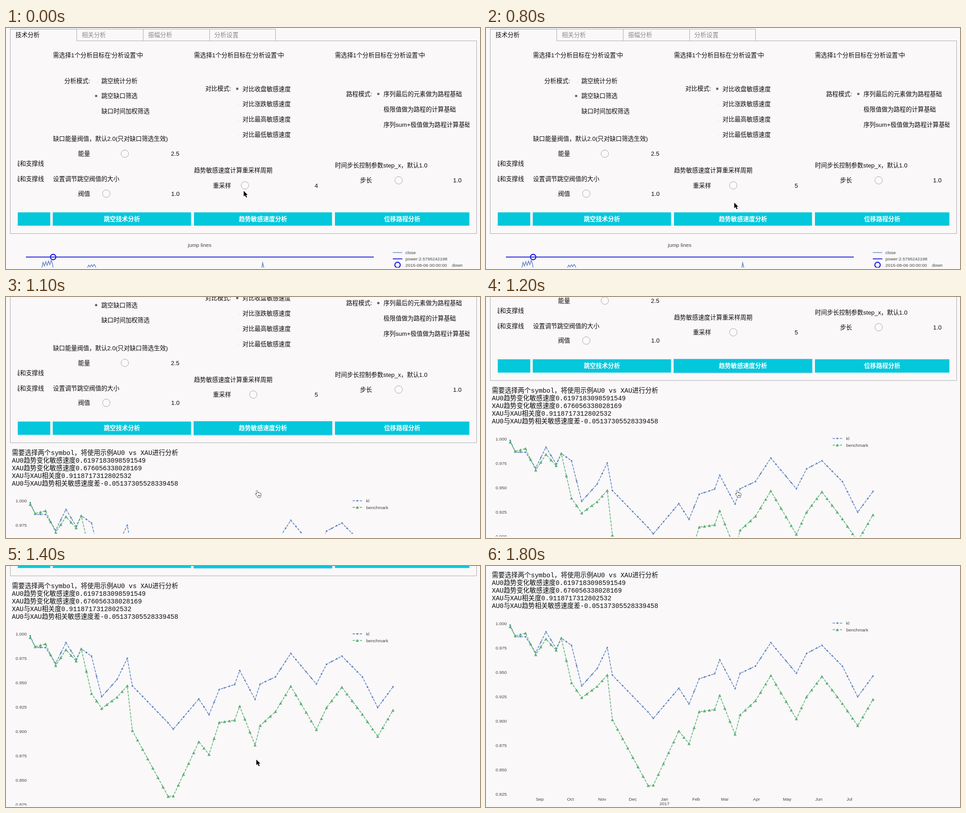
Animation of 1049 by 534 pixels, one loop 2 s. Source, as an HTML page with a canvas:

```html
<!DOCTYPE html>
<html lang="zh">
<head>
<meta charset="utf-8">
<style>
html, body { margin: 0; width: 100%; height: 100%; overflow: hidden; background: #faf8f9; }
canvas { display: block; }
</style>
</head>
<body>
<canvas id="stage" width="1049" height="534"></canvas>
<script>
const ctx = document.getElementById('stage').getContext('2d');
const BG = '#faf8f9', INK = '#0c0c0c', CYAN = '#03c7db', BORDER = '#a9a7a8';
const KL = '#5b82c2', BENCH = '#5bb075', ROYAL = '#2222e4';
const CJK = '"Noto Sans CJK SC", "Noto Sans CJK", sans-serif';
const UI = '13.35px "Liberation Sans", ' + CJK;
const MONO = '14.38px "Liberation Mono", ' + CJK;
const SMALL = '9.9px "Liberation Sans", sans-serif';
const TITLE = '11.6px "Liberation Sans", sans-serif';
const STEP = 100, LOOP = 2000;

// Each key is [position, ...values]
const pointerKeys = [[0, 526, 361], [2, 528, 352], [5, 544, 352], [7, 547, 366], [10, 554, 429]];
// Turning points shared by both curves: sample, kl height, benchmark height
const turns = [[0, 589, 593], [1, 615, 613], [3, 615, 607], [5, 650, 655], [7, 604, 620], [9, 641, 645],
  [10, 618, 618], [12, 634, 717], [14, 724, 750], [17, 686, 725], [19, 639, 700], [20, 700, 799],
  [27, 782, 945], [28, 796, 944], [33, 729, 824], [35, 764, 852], [37, 708, 781], [40, 697, 776],
  [41, 666, 745], [44, 730, 831], [45, 696, 788], [48, 680, 757], [51, 628, 701], [56, 696, 797],
  [58, 652, 748], [61, 634, 703], [65, 680, 763], [68, 748, 812], [71, 702, 754]];

function along(keys, pos) {
  const i = Math.max(1, keys.findIndex(key => key[0] >= pos));
  const [from, ...a] = keys[i - 1], [to, ...b] = keys[i];
  return a.map((v, j) => v + (b[j] - v) * (pos - from) / (to - from));
}

// Scrolling starts after step 10 and settles at 457.5 px
function scrollAt(step) {
  const n = Math.max(0, step - 10);
  return 457.5 * (1 - Math.exp(-n * (0.264 + 0.0646 * n + 0.0135 * n * n)));
}

function text(str, x, y, { font = UI, color = INK, align = 'left', shift = 4.8 } = {}) {
  ctx.font = font;
  ctx.fillStyle = color;
  ctx.textAlign = align;
  ctx.fillText(str, x, y + shift);
}
const small = (str, x, y, align, font = SMALL) => text(str, x, y, { font, color: '#444', align, shift: 3.5 });

function path(points, color, width = 1, dash = []) {
  ctx.beginPath();
  points.forEach(([x, y]) => ctx.lineTo(x, y));
  ctx.setLineDash(dash);
  ctx.strokeStyle = color;
  ctx.lineWidth = width;
  ctx.stroke();
  ctx.setLineDash([]);
}
const hline = (x1, x2, y, color, width, dash) => path([[x1, y], [x2, y]], color, width, dash);

function circle(x, y, r, fill, stroke, width = 1) {
  ctx.beginPath();
  ctx.arc(x, y, r, 0, 7);
  if (fill) { ctx.fillStyle = fill; ctx.fill(); }
  if (stroke) { ctx.strokeStyle = stroke; ctx.lineWidth = width; ctx.stroke(); }
}

function clipped(x, y, w, h, draw) {
  ctx.save();
  ctx.beginPath();
  ctx.rect(x, y, w, h);
  ctx.clip();
  draw();
  ctx.restore();
}

function radios(labels, x, y, gap, chosen) {
  labels.forEach((label, i) => {
    const cy = y + gap * i;
    if (i === chosen) circle(x - 11.5, cy, 2.6, '#666');
    else {
      ctx.beginPath();
      ctx.arc(x - 11.5, cy, 4.5, 0.1, 1.3);
      ctx.strokeStyle = '#e6e4e5';
      ctx.lineWidth = 1;
      ctx.stroke();
    }
    text(label, x, cy);
  });
}

function slider(label, x, y, knobX, value, valueX, active) {
  text(label, x, y);
  circle(knobX, y, active ? 10 : 8.3, active ? CYAN : '#fcfafb', active ? null : '#a4a2a3');
  text(value, valueX, y);
}

function button(label, x, w, focused) {
  ctx.fillStyle = CYAN;
  ctx.fillRect(x, 408.5, w, 29.5);
  if (focused) {
    ctx.strokeStyle = '#4fb4ea';
    ctx.lineWidth = 1.2;
    ctx.strokeRect(x - 0.3, 408.2, w + 0.6, 30.3);
  }
  text(label, x + w / 2, 423, { font: 'bold ' + UI, color: '#fff', align: 'center' });
}

function tabs() {
  path([[156.5, 28.5], [1041.5, 28.5], [1041.5, 455.5], [9.5, 455.5], [9.5, 2.5]], BORDER);
  hline(156.5, 597, 2.5, BORDER);
  hline(9, 156.5, 2.5, '#7c9fc6');
  ['技术分析', '相关分析', '振幅分析', '分析设置'].forEach((name, i) => {
    const right = 156.5 + Math.round(146.8 * i);
    path([[right, 2.5], [right, 28.5]], BORDER);
    text(name, 21 + 146.7 * i, 15, { color: i ? '#8b898a' : INK });
  });
}

function panel(step) {
  tabs();
  [104, 416, 728].forEach(x => text("需选择1个分析目标在'分析设置'中", x, 60.5));

  text('分析模式:', 129, 117);
  radios(['跳空统计分析', '跳空缺口筛选', '缺口时间加权筛选'], 211, 117, 33.5, 1);
  text('缺口能量阀值，默认2.0(只对缺口筛选生效)', 104, 245.5);
  slider('能量', 159.5, 278.5, 263, '2.5', 365);
  text('设置调节跳空阀值的大小', 104, 334.5);
  slider('阀值', 159.5, 367, 222, '1.0', 365.5);

  text('对比模式:', 441, 134.5);
  radios(['收盘', '涨跌', '最高', '最低'].map(s => `对比${s}敏感速度`), 523.3, 134.7, 33.9, 0);
  text('趋势敏感速度计算重采样周期', 416, 315.5);
  const value = step < 4 ? 4 : 5;
  slider('重采样', 458, 348.7, 454.3 + 18.6 * value, value, 683, step >= 2 && step <= 6);

  text('路程模式:', 753, 146);
  clipped(700, 0, 326, 500, () =>
    radios(['序列最后的元素做为路程基础', '极限值做为路程的计算基础', '序列sum+极值做为路程计算基础'], 835.5, 146, 34, 0));
  text('时间步长控制参数step_x，默认1.0', 728, 304.5);
  slider('步长', 783.5, 337.5, 869, '1.0', 989.5);

  clipped(26, 0, 70, 500, () => [300.5, 334.5].forEach(y => text('线和支撑线', 17.3, y)));

  button('', 26, 72);
  button('跳空技术分析', 103.5, 306);
  button('趋势敏感速度分析', 416, 305.5, step >= 10);
  button('位移路程分析', 728, 297.5);
}

// Tips of a price line that stick out above the fold
function spikes(x, y, count, gap, height) {
  const points = [[x, y]];
  for (let i = 0; i < count; i++) {
    const top = y - height * (0.85 + 0.1 * i);
    points.push([x + gap * (i + 0.5), top], [x + gap * (i + 1), top + height * 0.55]);
  }
  path([...points, [x + gap * count + 1, y]], KL, 1.5);
}

function jumpChart() {
  small('jump lines', 428.5, 481, 'center', TITLE);
  spikes(79, 532, 4, 6, 15);
  spikes(180, 532, 3, 6, 8);
  spikes(566, 533, 1, 4, 15);
  hline(44, 814, 507.5, ROYAL, 2);
  circle(104.3, 507.5, 6, null, ROYAL, 2.4);
  hline(856, 877, 497.5, KL, 1.4);
  hline(856, 877, 511.5, ROYAL, 2);
  circle(866.5, 525, 6, null, ROYAL, 2.4);
  ['close', 'power:2.5795242198', '2015-08-06 00:00:00'].forEach((s, i) => small(s, 884, 497.5 + 14 * i));
  small('down', 987, 525.5);
}

const dot = (x, y) => circle(x, y, 1.8, KL);
function triangle(x, y) {
  ctx.beginPath();
  ctx.moveTo(x, y - 3.3);
  ctx.lineTo(x + 3.4, y + 3);
  ctx.lineTo(x - 3.4, y + 3);
  ctx.fillStyle = BENCH;
  ctx.fill();
}

function trendChart() {
  for (let i = 0; i < 8; i++) small((1 - i * 0.025).toFixed(3), 46, 584.5 + 54 * i, 'right');

  const firstDay = Date.UTC(2016, 8, 1);
  'Sep Oct Nov Dec Jan Feb Mar Apr May Jun Jul'.split(' ').forEach((month, i) => {
    const days = (Date.UTC(2016, 8 + i, 1) - firstDay) / 864e5;
    const x = 119 + 2.262 * days;
    small(month, x, 974, 'center');
    if (month === 'Jan') small('2017', x, 984, 'center');
  });

  [['kl', KL, dot], ['benchmark', BENCH, triangle]].forEach(([name, color, marker], row) => {
    const points = Array.from({ length: 72 }, (_, i) => [53.5 + 11.31 * i, along(turns, i)[row] - 0.7]);
    path(points, color, 1.6, [5.5, 2.5]);
    points.forEach(([x, y]) => marker(x, y));

    const y = 584 + 14.7 * row;
    hline(767, 788, y, color, 1.6, [5.5, 2.5]);
    marker(777.5, y);
    small(name, 797, y);
  });
}

function result() {
  ['需要选择两个symbol，将使用示例AU0 vs XAU进行分析',
    'AU0趋势变化敏感速度0.6197183098591549',
    'XAU趋势变化敏感速度0.676056338028169',
    'XAU与XAU相关度0.9118717312802532',
    'AU0与XAU趋势相关敏感速度差-0.05137305528339458']
    .forEach((line, i) => text(line, 13, 478 + 16.9 * i, { font: MONO }));
  trendChart();
}

const arrow = new Path2D('M0 0V12.2L3 9.6L5.2 14.4L7.4 13.4L5.2 8.8H8.8Z');
const hand = new Path2D('M0 1.2C0-.6 2.4-.6 2.6 1.2L3.4 5.4C4.2 4.2 5.6 4.6 5.8 5.6C6.6 4.8 7.8 5.2 8 6.2' +
  'C9 5.6 10.2 6.2 10.2 7.4L10 11L8.8 13V15H2.8V13.4L-.6 9.4C-2.8 7.2-1.6 5.8.2 7.2L1.4 8.2Z');
const knuckles = new Path2D('M4.2 9.5V12.5M6 9.5V12.5M7.8 9.5V12.5');

function cursor(step) {
  if (step > 17) return;
  const isHand = step >= 9 && step <= 12;
  const shape = isHand ? hand : arrow;
  ctx.save();
  ctx.translate(...along(pointerKeys, Math.min(step, 10)));
  ctx.lineJoin = 'round';
  ctx.lineWidth = isHand ? 1.2 : 1.6;
  ctx.strokeStyle = isHand ? '#000' : '#fff';
  ctx.fillStyle = isHand ? '#fff' : '#000';
  ctx.stroke(shape);
  ctx.fill(shape);
  ctx.lineWidth = 0.8;
  if (isHand) ctx.stroke(knuckles);
  ctx.restore();
}

function draw(now) {
  const step = Math.min(18, Math.floor(now % LOOP / STEP));
  ctx.fillStyle = BG;
  ctx.fillRect(0, 0, 1049, 534);
  // The output area is still growing while the first scroll step shows
  clipped(0, 0, 1049, step === 11 ? 524.5 : 531, () => {
    ctx.translate(0, -scrollAt(step));
    panel(step);
    if (step < 10) jumpChart();
    else result();
  });
  cursor(step);
  requestAnimationFrame(draw);
}
requestAnimationFrame(draw);
</script>
</body>
</html>
```
